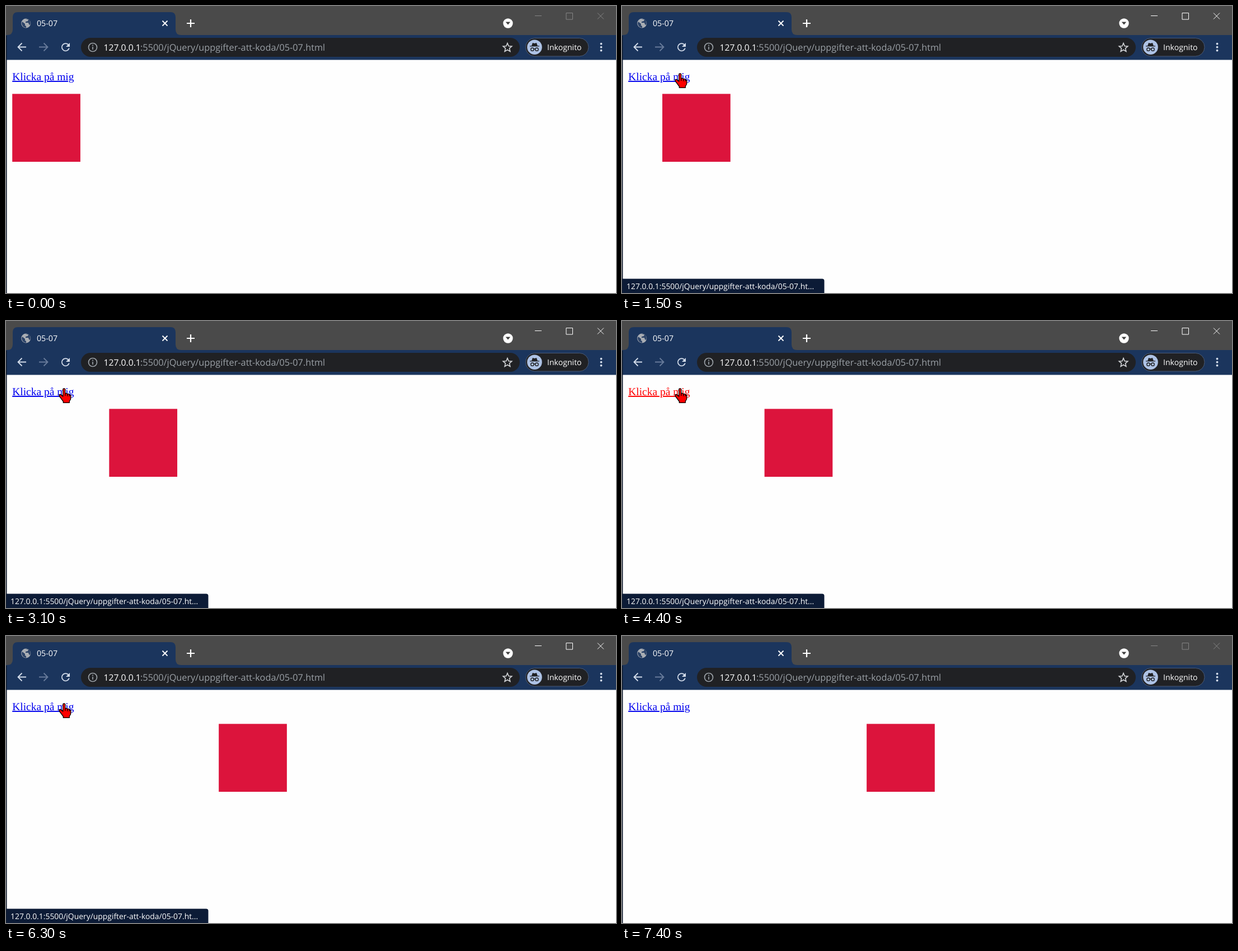
Write an HTML page that moves like this. It is 1090x514 px and loops after 7.5 s.

```html
<!DOCTYPE html>
<html lang="sv">
<head>
<meta charset="utf-8">
<title>05-07</title>
<style>
  html, body { margin: 0; width: 100%; height: 100%; overflow: hidden; background: #fefefe; }
  svg { display: block; }
  text { font-family: "Open Sans", "Noto Sans", sans-serif; fill: #fff; text-rendering: geometricPrecision; }
  #link { font: 19.47px "Liberation Serif", serif; text-decoration: underline; text-decoration-thickness: 1.2px; }
  .line { fill: none; stroke: #d3dcea; stroke-width: 1.8; }
</style>
</head>
<body>
<svg width="1090" height="514" viewBox="0 0 1090 514">
  <!-- tab strip -->
  <rect width="1090" height="53" fill="#4a4a4a"/>
  <path d="M2 52Q12 52 12 42V20Q12 11 21 11H294Q303 11 303 20V42Q303 52 313 52H1090V96.5H0V52Z" fill="#1b355d"/>
  <circle cx="35.7" cy="31" r="8.5" fill="#a9adb3"/>
  <path d="M29 28l5 4v3l2 1v3q-7-1-8-8ZM35 24h5l-1 3-4 1v2h5l1 3 2 1q2-5-1-9l-3-2Z" fill="#2c4368"/>
  <text x="55" y="36" font-size="14.2">05-07</text>
  <path class="line" d="M279.5 26.5l9 9m0-9l-9 9" style="stroke:#fff"/>
  <path class="line" d="M323 31h14m-7-7v14" style="stroke:#fff;stroke-width:2.2"/>
  <circle cx="897" cy="31" r="8.7" fill="#fff"/>
  <path d="M892.8 28.5h8.4l-4.2 5Z" fill="#3c3c3c"/>
  <path id="controls" d="M945 17.5h12M1001 12.5h11.5v11.5h-11.5ZM1057 12.500l11 11m0-11l-11 11" fill="none"/>

  <!-- toolbar -->
  <path class="line" d="M36 73.500H21.500M28.500 66.500l-7 7 7 7"/>
  <path class="line" d="M59 73.500H74M67.500 66.500l7 7-7 7" style="stroke:#687b9b"/>
  <path class="line" d="M111.300 69.300A6.600 6.600 0 1 0 112.800 75.500"/>
  <path d="M114 66v7h-7Z" fill="#d3dcea"/>
  <rect x="134" y="57" width="784" height="34" rx="17" fill="#202124"/>
  <g class="line" style="stroke:#9aa0a6;stroke-width:1.700">
    <circle cx="155" cy="74" r="7.500"/>
    <path d="M155 73v5M155 69.500v2"/>
  </g>
  <text x="174.500" y="80" font-size="15.700">127.0.0.1</text>
  <text x="240" y="80" font-size="16.300" style="fill:#9aa0a6">:5500/jQuery/uppgifter-att-koda/05-07.html</text>
  <path class="line" d="M896 66.500l2.200 5.200 5.600.500-4.300 3.700 1.300 5.500-4.800-2.900-4.800 2.900 1.300-5.500-4.300-3.700 5.600-.500Z" style="stroke:#d5d7da;stroke-width:1.600"/>
  <rect x="928.500" y="57.500" width="112.500" height="32.500" rx="16.250" fill="#202124" stroke="#4a5a75"/>
  <circle cx="944.500" cy="73.700" r="13.300" fill="#adc2e5"/>
  <path d="M936 72.500h17v-1.300h-3.200l-1.800-5.200-3.500 1-3.500-1-1.800 5.200H936Z" fill="#202124"/>
  <g class="line" style="stroke:#202124;stroke-width:1.400">
    <circle cx="940.500" cy="77.700" r="2.700"/>
    <circle cx="948.500" cy="77.700" r="2.700"/>
    <path d="M943 77.300q1.500-1 3 0"/>
  </g>
  <text x="967" y="79" font-size="14.100" font-weight="500">Inkognito</text>
  <g fill="#d3dcea">
    <circle cx="1063.500" cy="67.700" r="1.900"/>
    <circle cx="1063.500" cy="73.700" r="1.900"/>
    <circle cx="1063.500" cy="79.700" r="1.900"/>
  </g>

  <!-- page -->
  <rect y="53" width="1.500" height="461" fill="#101b2d"/>
  <text id="link" x="11.200" y="133">Klicka på mig</text>
  <rect id="box" y="157.400" width="121.700" height="121.600" fill="#dc143c"/>
  <g id="status">
    <path d="M1 488.500H357.500Q361.500 488.500 361.500 492.500V514H1Z" fill="#0c1b36"/>
    <text x="8" y="507" font-size="13.900">127.0.0.1:5500/jQuery/uppgifter-att-koda/05-07.ht...</text>
  </g>
  <g id="cursor" fill="#f00" stroke="#000" stroke-width="1.300" stroke-linejoin="round">
    <path id="arrow" d="M0 0V20L4.500 15.800 8 23.800 11 22.500 7.700 14.600H14Z"/>
    <g id="hand">
      <path d="M-2 2.800Q-2 .800 0 .800T2 2.800V9.500Q5.300 8.800 6 10.800 9 10 9.500 12 12 12 12 14.500V18.500Q11.800 21.500 9.500 23.500V26.300H-1.500V24L-4.500 20-8.500 14.500Q-9.500 11.500-7 11.500-5 11.800-2 15Z"/>
      <path d="M2 9.500v4.500M6 10.800v4M9.500 12v3" fill="none"/>
    </g>
  </g>
</svg>
<script>
const LOOP = 7500, TICK = 100, SLIDE = 400, STEP = 60.85;
// press and release time of each click
const clicks = [[900, 1000], [1900, 2000], [2700, 2800], [3500, 3570],
                [4400, 4470], [5200, 5336], [6210, 6232]];
const [controls, link, box, statusBar, cursor, arrow, hand] =
  ['controls', 'link', 'box', 'status', 'cursor', 'arrow', 'hand']
    .map(id => document.getElementById(id));

const swing = (t, start, length) =>
  0.5 - Math.cos(Math.PI * Math.min(1, Math.max(0, (t - start) / length))) / 2;
const mix = (a, b, p) => a + (b - a) * p;
const show = (node, on) => node.setAttribute('visibility', on ? 'visible' : 'hidden');

function draw(t) {
  const moved = clicks.reduce((sum, [, up]) => sum + swing(t, up + 3, SLIDE), 0);
  box.setAttribute('x', 11.2 + STEP * moved);

  const pressed = clicks.some(([down, up]) => t >= down && t < up);
  link.style.fill = pressed ? '#f00' : '#00e';

  const focused = t >= 900 && t < 7400;
  controls.setAttribute('stroke', focused ? '#fff' : '#858585');
  statusBar.setAttribute('opacity', t < 900 || t >= 7100 ? 0 : t < 7000 ? 1 : 0.5);

  const enter = swing(t, 80, 620), leave = swing(t, 6550, 450);
  const x = mix(mix(1000, 103.8, enter), 1005, leave);
  const y = mix(mix(54, 120, enter), 122, leave);
  const visible = t >= 100 && t < 7400, onLink = x < 122;
  cursor.setAttribute('transform', `translate(${x} ${y})`);
  show(arrow, visible && !onLink);
  show(hand, visible && onLink);
}

function frame() {
  draw(Math.floor(performance.now() % LOOP / TICK) * TICK);
  requestAnimationFrame(frame);
}
frame();
</script>
</body>
</html>
```
